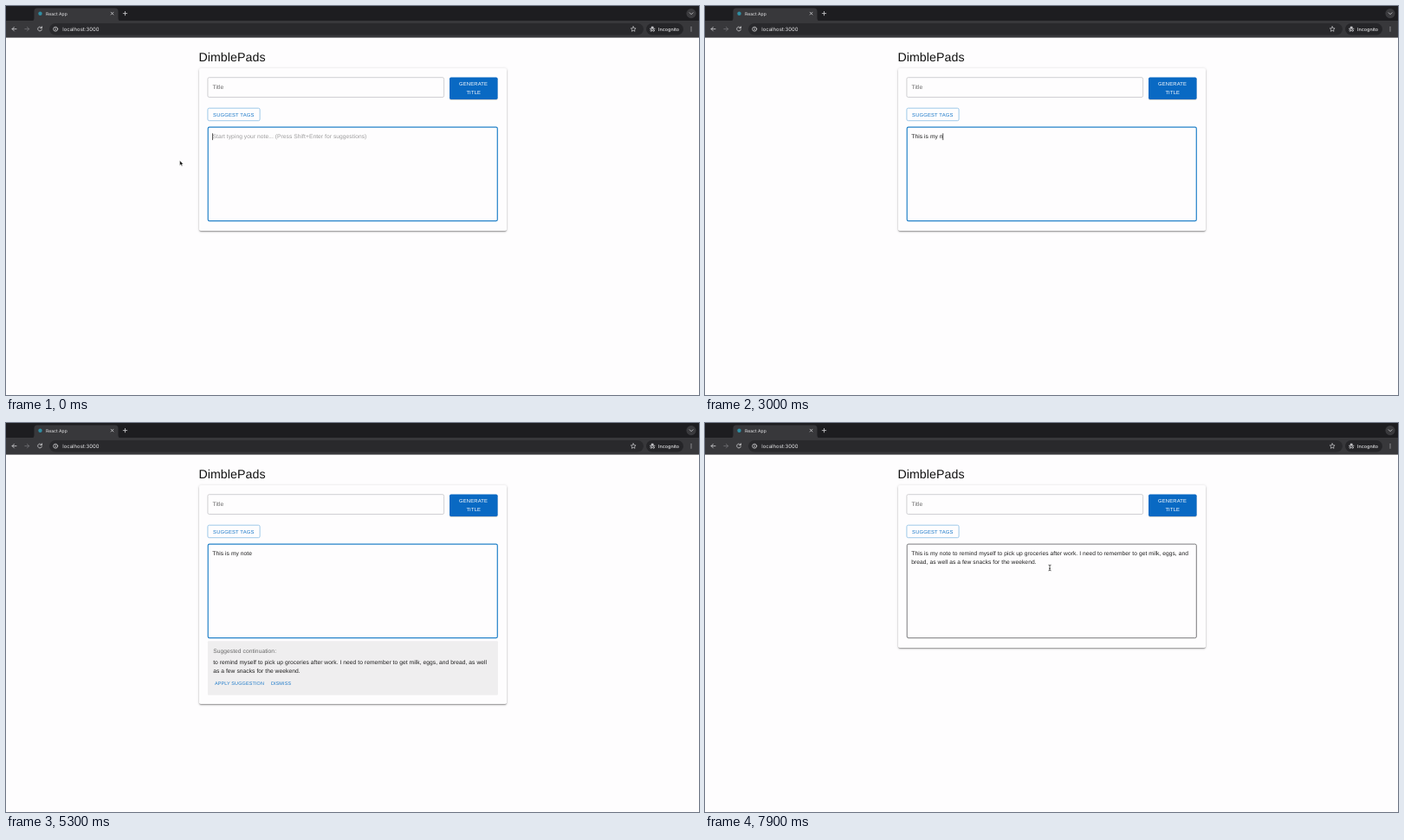
Animation of 800x450 px, one loop 8000 ms. Source, as an HTML page:

```html
<!DOCTYPE html>
<html lang="en">
<head>
<meta charset="utf-8">
<title>Note editor</title>
<style>
  html, body { margin: 0; width: 100%; height: 100%; overflow: hidden; background: #fefdfe; }
  #stage { position: relative; width: 800px; height: 450px; overflow: hidden; }
  #card {
    position: absolute; left: 222.6px; top: 72px; width: 355px; height: 187.5px;
    border-radius: 1.7px; background: #fefdfe;
    box-shadow: 0 1.25px 1.25px -.8px rgba(0,0,0,.3), 0 1.25px 1.7px rgba(0,0,0,.2), 0 .4px 3.3px rgba(0,0,0,.16);
  }
  svg { position: absolute; left: 0; top: 0; }
  text {
    font: 6.667px "Liberation Sans", Arial, sans-serif; letter-spacing: .00938em;
    fill: #1d1d1d; white-space: pre; text-rendering: geometricPrecision;
  }
  .heading { font-size: 14.17px; letter-spacing: .00735em; fill: #111; }
  .button { font-size: 5.833px; letter-spacing: .02857em; fill: #1a78c9; }
  .small { font-size: 5.417px; }
  .light { fill: #fff; }
  .label { fill: #686868; }
  .hint { fill: #9b9b9b; }
  .chrome { font: 6px Inter, Roboto, sans-serif; letter-spacing: 0; fill: #e6e6e8; }
  .icon { fill: none; stroke: #d2d2d5; stroke-width: .8; stroke-linecap: round; stroke-linejoin: round; }
  .field { fill: none; stroke: #c5c5c8; stroke-width: .8; }
</style>
</head>
<body>
<div id="stage">
  <div id="card"></div>
  <svg width="800" height="450" viewBox="0 0 800 450">
    <!-- browser bar -->
    <rect width="800" height="18" fill="#1d1d20"/>
    <path d="M29 17.5q3.5 0 3.5-3.5V6q0-3.5 3.5-3.5H126q3.5 0 3.5 3.5V14q0 3.5 3.5 3.5Z" fill="#38383b"/>
    <rect y="17" width="800" height="19.6" fill="#38383b"/>
    <circle cx="39.5" cy="8.7" r="2.2" fill="#2f8ea3"/>
    <text class="chrome" x="46" y="10.6" style="font-size:5.1px">React App</text>
    <g class="icon">
      <path d="M121.2 7.2l2.8 2.8m0-2.8l-2.8 2.8M135.3 8.6h4.4M137.5 6.4v4.4"/>
      <path d="M12 26.6H7.2m2.2-2.3l-2.3 2.3 2.3 2.3"/>
      <path d="M21.8 26.6h4.8m-2.2-2.3l2.3 2.3-2.3 2.3" stroke="#737377"/>
      <path d="M41.2 25.3a2.4 2.4 0 1 0 .2 2M41.5 23.8v1.8h-1.8"/>
    </g>
    <rect x="50" y="20" width="686" height="13.6" rx="6.8" fill="#29292c"/>
    <rect x="739" y="20" width="43" height="13.6" rx="6.8" fill="#252528"/>
    <circle cx="791" cy="8.6" r="5.6" fill="#3a3a3d"/>
    <g class="icon">
      <path d="M789.2 7.8l1.9 1.9 1.9-1.9"/>
      <circle cx="57.2" cy="26.7" r="2.5"/>
      <path d="M57.2 26.5v1.3M57.2 25.2v.1"/>
      <path d="M724.2 23.8l.9 1.9 2 .2-1.5 1.4.4 2-1.8-1-1.8 1 .4-2-1.5-1.4 2-.2Z" stroke-width=".7"/>
      <path d="M743.4 26.3h5.6"/>
      <circle cx="744.8" cy="28.4" r=".9"/>
      <circle cx="747.6" cy="28.4" r=".9"/>
    </g>
    <path d="M744.5 25.8l.6-2h2.2l.6 2Z" fill="#d2d2d5"/>
    <g fill="#d2d2d5">
      <circle cx="791" cy="24.6" r=".6"/><circle cx="791" cy="26.7" r=".6"/><circle cx="791" cy="28.8" r=".6"/>
    </g>
    <text class="chrome" x="65.2" y="28.9">localhost:3000</text>
    <text class="chrome" x="753" y="28.7" style="font-size:5.4px;font-weight:500">Incognito</text>

    <!-- form -->
    <text class="heading" x="222.4" y="63.7">DimblePads</text>
    <rect class="field" x="232.9" y="82.7" width="272.7" height="22.8" rx="1.7"/>
    <text class="label" x="238.5" y="95.9">Title</text>
    <rect x="512" y="83.4" width="55.6" height="25.6" rx="1.7" fill="#000" opacity=".18"/>
    <rect x="512" y="82.5" width="55.6" height="25.4" rx="1.7" fill="#0969c3"/>
    <text class="button light" x="523.1" y="92.1">GENERATE</text>
    <text class="button light" x="531.4" y="102.2">TITLE</text>
    <rect class="field" x="232.9" y="118.2" width="60.2" height="14.5" rx="1.7" style="stroke:#88bde5"/>
    <text class="button" x="239.1" y="127.6">SUGGEST TAGS</text>

    <rect class="field" id="area" x="233.2" y="140.1" width="334.1" height="108.6" rx="1.7"/>
    <text class="hint" id="hint" x="238.5" y="153.4">Start typing your note... (Press Shift+Enter for suggestions)</text>
    <text id="line1" x="238.3" y="153.4"></text>
    <text id="line2" x="238.3" y="163"></text>
    <rect id="caret" y="147.3" width=".7" height="7.8" fill="#111"/>

    <g id="suggestion">
      <rect x="232.9" y="252.3" width="335" height="62.4" rx="1" fill="#efeeef"/>
      <text class="label" x="239.2" y="266.4">Suggested continuation:</text>
      <text x="239.2" y="278.8">to remind myself to pick up groceries after work. I need to remember to get milk, eggs, and bread, as well</text>
      <text x="239.2" y="288.8">as a few snacks for the weekend.</text>
      <rect id="hover" x="238.9" y="294.6" width="61.9" height="12.8" rx="1.7" fill="#1976d2" opacity=".07"/>
      <text class="button small" x="241" y="303">APPLY SUGGESTION</text>
      <text class="button small" x="305.9" y="303">DISMISS</text>
    </g>

    <!-- pointers, each with its hot spot at 0,0 -->
    <path id="arrow" d="M0 0V5.6L1.3 4.4 2.2 6.5 3.2 6.1 2.3 4.1H4Z" fill="#111" stroke="#fff" stroke-width=".4"/>
    <path id="hand" d="M-.6 .3Q0-.5 .6 .3V2.2L2.9 2.7Q3.5 2.9 3.4 3.6L2.8 6.2H-.4L-2.2 3.9Q-1.8 2.9-.6 3.7Z" fill="#fff" stroke="#111" stroke-width=".75"/>
    <path id="beam" d="M-1.5-3.3Q0-3.3 0-2.5Q0-3.3 1.5-3.3M0-2.5V2.5M-1.5 3.3Q0 3.3 0 2.5Q0 3.3 1.5 3.3M-.8 .9H.8" fill="none" stroke="#222" stroke-width=".75"/>
  </svg>
</div>
<script>
  const LOOP = 8000, STEP = 100;
  const SHOWN = 5000, BLUR = 6200, APPLIED = 6500;
  const TYPED = "This is my note ";
  const KEYS = [600, 700, 800, 900, 1000, 1700, 1900, 2000, 2300, 2500, 2700, 2900, 3100, 3200, 3400, 3500];
  const FULL = [
    TYPED + "to remind myself to pick up groceries after work. I need to remember to get milk, eggs, and",
    "bread, as well as a few snacks for the weekend."
  ];
  // time, x, y
  const PATH = [
    [5500, 214, 192], [5800, 242, 262], [6100, 269.8, 302.6],
    [6700, 269.8, 302.6], [7200, 391, 180], [7500, 398, 167.5]
  ];

  const el = {};
  document.querySelectorAll("#stage [id]").forEach(n => el[n.id] = n);
  const show = (node, on) => node.style.display = on ? "" : "none";
  const ease = p => p * p * (3 - 2 * p);

  function pointerAt(t) {
    if (t < KEYS[0]) return [200.6, 178.8];
    if (t < PATH[0][0]) return null;
    const i = PATH.findIndex(p => p[0] > t);
    if (i < 0) return PATH[PATH.length - 1].slice(1);
    const [t0, x0, y0] = PATH[i - 1], [t1, x1, y1] = PATH[i];
    const p = ease((t - t0) / (t1 - t0));
    return [x0 + (x1 - x0) * p, y0 + (y1 - y0) * p];
  }

  function inside(point, x, y, w, h) {
    return !!point && point[0] > x && point[0] < x + w && point[1] > y && point[1] < y + h;
  }

  function draw(t) {
    const count = KEYS.filter(k => k <= t).length;
    const applied = t >= APPLIED, open = t >= SHOWN && !applied, focused = t < BLUR;

    show(el.hint, count === 0);
    el.line1.textContent = applied ? FULL[0] : TYPED.slice(0, count);
    el.line2.textContent = applied ? FULL[1] : "";

    const idle = t - (count ? KEYS[count - 1] : 0);
    show(el.caret, focused && idle % 1000 < 500);
    el.caret.setAttribute("x", 238.2 + (count ? el.line1.getComputedTextLength() : 0));

    show(el.suggestion, open);
    el.card.style.height = (open ? 252.5 : 187.5) + "px";

    const point = pointerAt(t);
    const overArea = inside(point, 233, 140, 334.5, 109);
    const overApply = open && inside(point, 238.9, 294.6, 61.9, 12.8);
    show(el.hover, overApply);
    el.area.style.stroke = focused ? "#2482c9" : overArea ? "#58585b" : "#b9b9bc";
    el.area.style.strokeWidth = focused ? 1.2 : .8;

    const kind = !point ? "" : overApply ? "hand" : overArea ? "beam" : "arrow";
    for (const name of ["arrow", "hand", "beam"]) {
      show(el[name], name === kind);
      if (name === kind) el[name].setAttribute("transform", `translate(${point})`);
    }
  }

  const start = performance.now();
  function tick() {
    const t = (performance.now() - start) % LOOP;
    draw(Math.floor(t / STEP) * STEP);
    requestAnimationFrame(tick);
  }
  tick();
</script>
</body>
</html>
```
